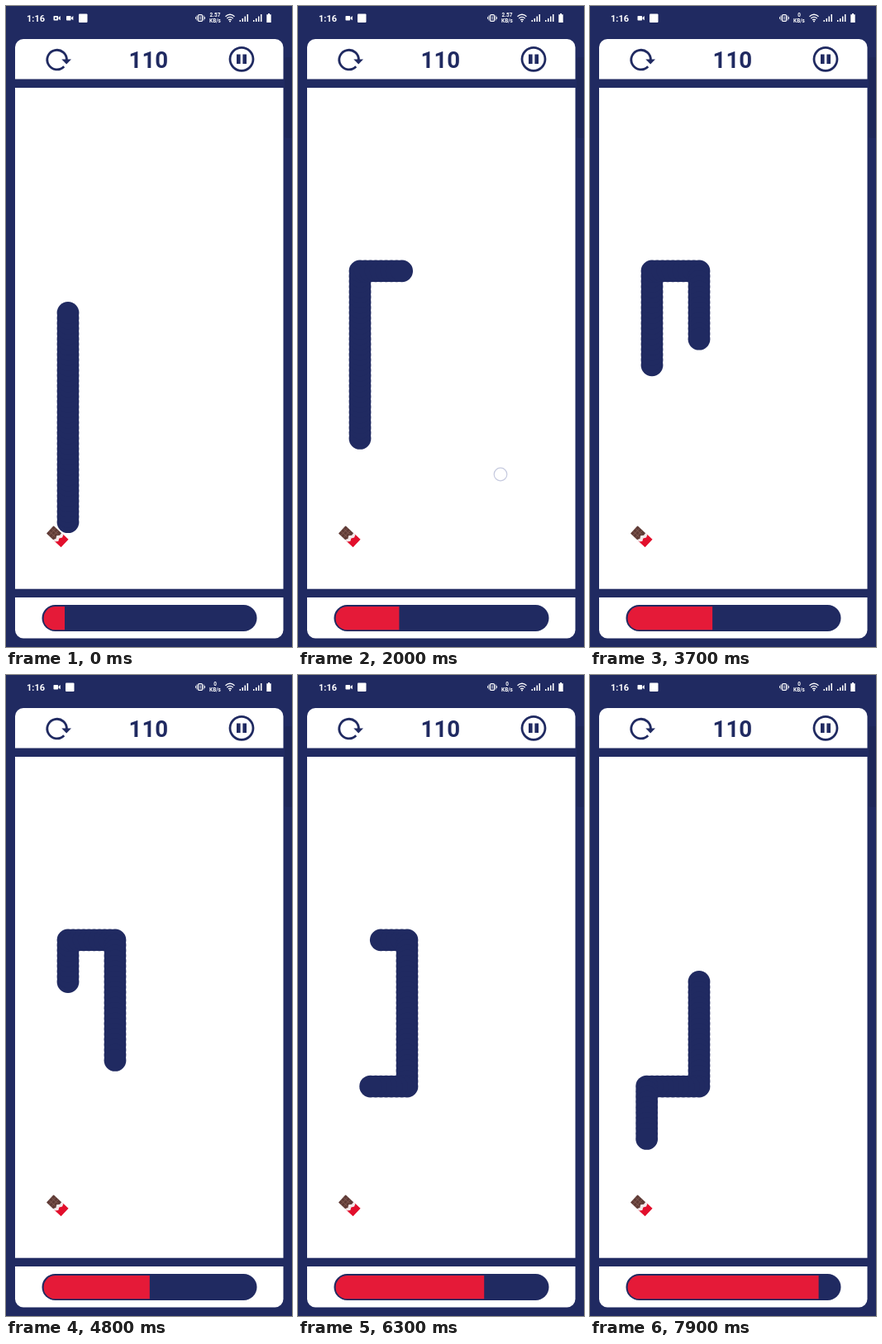
Recreate the animation shown at these times as an HTML page. Size 346 px wide and 776 px high, loop 8000 ms.

```html
<!DOCTYPE html>
<html lang="en">
<head>
<meta charset="utf-8">
<title>Snake game</title>
<style>
  html, body { margin: 0; width: 100%; height: 100%; overflow: hidden; background: #202a61; }
  svg { display: block; width: 100%; height: 100%; }
  text { font-family: Roboto, Arial, sans-serif; font-weight: 700; }
  .navy { fill: #202a61; }
  .line { fill: none; stroke: #202a61; stroke-width: 2.8; }
</style>
</head>
<body>
<svg viewBox="0 0 346 776">
  <defs>
    <clipPath id="pill"><rect x="45.5" y="727" width="256" height="28.5" rx="14.2"/></clipPath>
    <g id="camera"><rect x="-4" y="-2.8" width="5.6" height="5.6" rx=".8"/><path d="M2 -.8L4.3 -2.6V2.6L2 .8Z"/></g>
    <path id="signal" d="M-5 4.5v-2h1.5v2zM-2 4.5v-4h1.5v4zM1 4.5v-6.5h1.5v6.5zM4 4.5v-9h1.5v9z"/>
  </defs>
  <rect class="navy" width="346" height="776"/>
  <rect x="337" y="62" width="12" height="98" rx="3" fill="#1e2759"/>

  <!-- status bar -->
  <g fill="#fff">
    <text x="25" y="18.7" font-size="11">1:16</text>
    <use href="#camera" x="61.5" y="14.7"/>
    <circle id="lens" class="navy" cx="60.3" cy="14.7" r="1.2"/>
    <use id="camera2" href="#camera" x="77" y="14.7"/>
    <rect id="badge" y="9.5" width="10.5" height="10.5" rx="1"/>
    <g fill="none" stroke="#fff">
      <rect x="232.6" y="10.6" width="4.8" height="7.8" rx="1" stroke-width="1.1"/>
      <path d="M231 11.5v6M239 11.5v6M229.5 13.2v2.6M240.5 13.2v2.6M235 12.5v4" stroke-width=".9"/>
      <path d="M265.5 12.7q5.5 -4.8 11 0M267.3 14.9q3.7 -3.1 7.4 0M269 17q2 -1.6 4 0" stroke-width="1.3"/>
    </g>
    <circle cx="271" cy="18.4" r="1"/>
    <g font-size="6.4" text-anchor="middle">
      <text id="speed" x="253" y="13.4"></text>
      <text x="253" y="19.6">KB/s</text>
    </g>
    <use href="#signal" x="287.5" y="14.4"/>
    <use href="#signal" x="304" y="14.4"/>
    <path d="M317 9h2v1.2h1.7v9.8h-5.4v-9.8h1.7z"/>
  </g>

  <!-- panels -->
  <g fill="#fff">
    <path d="M11 88.5V50a10 10 0 0 1 10 -10H325.5a10 10 0 0 1 10 10V88.5Z"/>
    <rect x="11" y="99" width="324.5" height="606.7"/>
    <path d="M11 716H335.5V755.5a10 10 0 0 1 -10 10H21a10 10 0 0 1 -10 -10Z"/>
  </g>

  <!-- header -->
  <path class="line" d="M70.2 73.2A11.8 11.8 0 1 1 73.4 66"/>
  <path class="navy" d="M67.3 64.4H79L73.2 70.4Z"/>
  <text class="navy" x="172.3" y="75.4" font-size="27.6" text-anchor="middle">110</text>
  <circle class="line" cx="285" cy="64.3" r="14"/>
  <path class="navy" d="M279 58.5h4.6v11.5h-4.6zM286.4 58.5h4.6v11.5h-4.6z"/>

  <!-- chocolate -->
  <g transform="translate(62 642) rotate(43)">
    <rect x="-12" y="-6.4" width="14" height="12.8" rx=".8" fill="#5f3b36"/>
    <path d="M-8 -6V6M-4 -6V6M-11.5 -2H0M-11.5 2.2H0" stroke="#8b6259" stroke-width=".7"/>
    <path d="M3 -6.6H12.4V6.6H1L3 3.5L1 .5L4 -2.5Z" fill="#e20f2c"/>
    <path d="M1 -6.6H4L5.5 -3L3.5 .3L5 3.4L2.6 6.6H-1L.8 3L-1.2 0L1.5 -3Z" fill="#f3e9ea"/>
  </g>

  <g id="snake" class="navy"></g>
  <circle id="touch" r="7.8" fill="#fff" stroke="#c6cadf" stroke-width="1.2"/>

  <!-- progress -->
  <rect class="navy" x="43.5" y="725" width="260" height="32" rx="16"/>
  <rect id="fill" x="45.3" y="727" height="28.5" fill="#e51a38" clip-path="url(#pill)"/>
</svg>
<script>
const $ = id => document.getElementById(id);
const LOOP = 8000, TICK = 100, STEP = 6.33, LENGTH = 41;

// Route from the tail's first position: direction and number of steps
const route = [[0, -1, 48], [1, 0, 9], [0, 1, 28], [-1, 0, 10], [0, 1, 30]];
// Ticks on which the snake rests
const rests = [1, 5, 12, 18, 27, 34, 36, 42, 49, 55, 60, 64, 70, 76];
// Swipes: first tick, then the finger's place on each tick
const swipes = [
  [8, [202, 386], [240, 384], [291, 382]],
  [19, [229, 515], [245, 567], [284, 650]],
  [51, [262, 600], [224, 602], [176, 603]],
  [65, [238, 540], [243, 600]]
];

const dots = Array.from({ length: LENGTH }, () => {
  const dot = document.createElementNS("http://www.w3.org/2000/svg", "circle");
  dot.setAttribute("r", 13.4);
  return $("snake").appendChild(dot);
});

function place(el, x, y) {
  el.setAttribute("cx", x);
  el.setAttribute("cy", y);
}

function pointAt(n) {
  let x = 75, y = 624.7;
  for (const [dx, dy, count] of route) {
    const k = Math.min(n, count);
    x += dx * k * STEP;
    y += dy * k * STEP;
    n -= k;
  }
  return [x, y];
}

function draw(time) {
  const tick = Math.floor(time % LOOP / TICK);
  const moved = tick - rests.filter(r => r <= tick).length;
  dots.forEach((dot, i) => place(dot, ...pointAt(moved + i)));

  const swipe = swipes.find(([start, ...path]) => tick >= start && tick < start + path.length);
  $("touch").style.display = swipe ? "" : "none";
  if (swipe) place($("touch"), ...swipe[tick - swipe[0] + 1]);

  const level = 1 + Math.floor((tick + 1) / 10);
  $("fill").setAttribute("width", 25.7 * level);

  const twoCameras = tick < 16;
  $("lens").style.display = $("camera2").style.display = twoCameras ? "" : "none";
  $("badge").setAttribute("x", twoCameras ? 88 : 72);
  $("speed").textContent = tick < 25 ? "2.57" : "0";
}

const start = performance.now();
function loop() {
  draw(performance.now() - start);
  requestAnimationFrame(loop);
}
loop();
</script>
</body>
</html>
```
